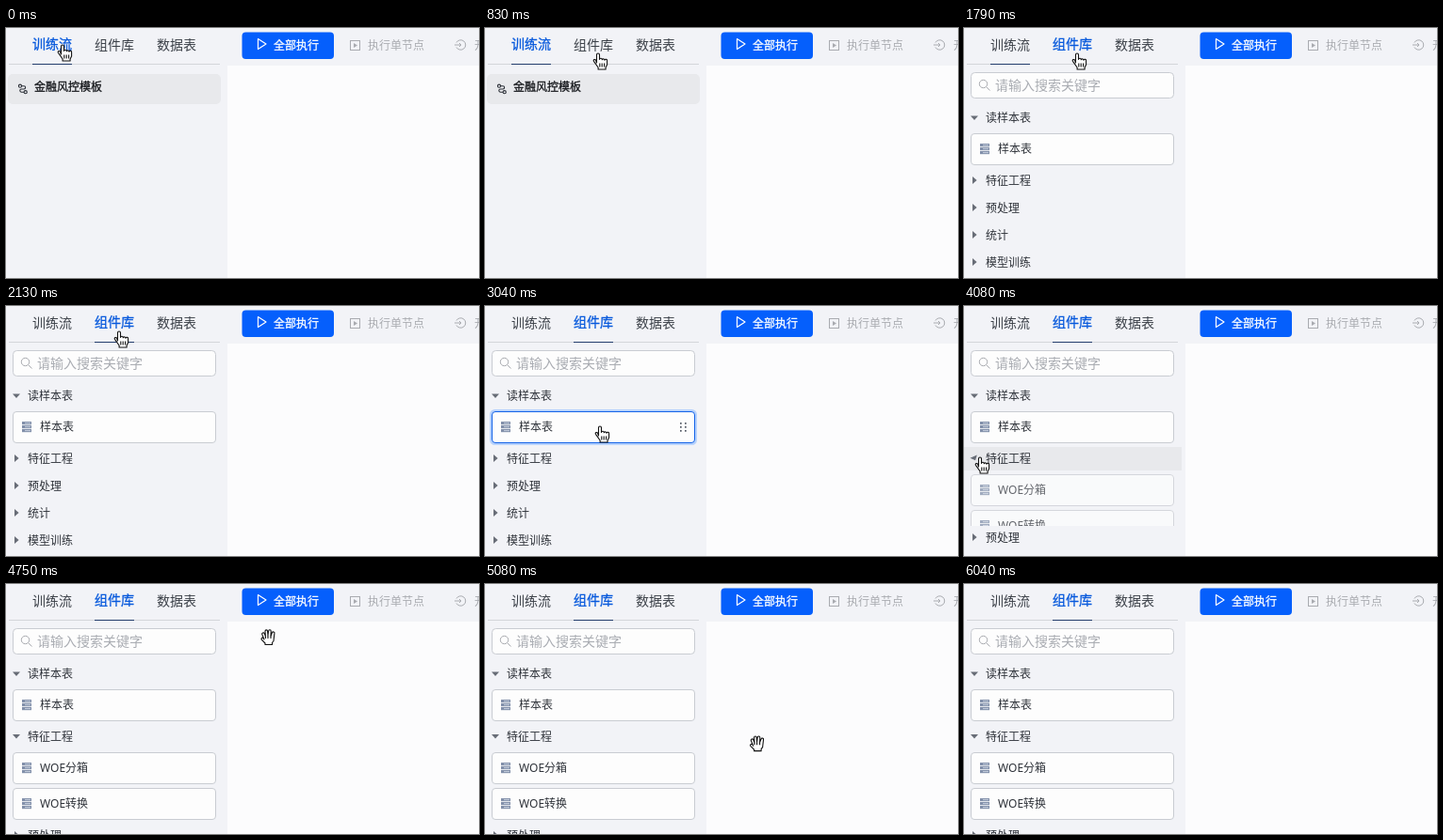
An HTML page for the animation above (6.71 s loop, 502x266 px).

```html
<!DOCTYPE html>
<html lang="zh-CN">
<head>
<meta charset="utf-8">
<style>
  html, body { margin: 0; width: 100%; height: 100%; overflow: hidden; background: #f2f3f7; }
  svg { display: block; }
  text { font: 12px "Noto Sans", "Noto Sans CJK SC", "Noto Sans CJK", "Noto Sans CJK JP", sans-serif; fill: #2f333a; }
  .tab { font-size: 14px; fill: #3b4048; }
  .tab.on { fill: #0759dc; stroke: #0759dc; stroke-width: .3; transform: translateY(-1px); }
  .strong { fill: #15171b; stroke: #15171b; stroke-width: .3; }
  .white { fill: #fff; stroke: #fff; stroke-width: .3; }
  .hint { font-size: 14px; fill: #a9acb2; }
  .off { fill: #a9abb0; }
  .line { fill: none; stroke: #a9abb0; }
  .box { fill: #fdfdfd; stroke: #c9ccd2; }
  .arrow { fill: #676c76; }
  .row { fill: none; }
  .hot > .row { fill: #e8e9ec; }
  .glow, .grip { visibility: hidden; }
  .hot > .glow, .hot > .grip { visibility: visible; }
  .hot > .box { stroke: #1262e8; }
  .hand path { fill: #fff; stroke: #111; stroke-width: 1.1; stroke-linejoin: round; }
</style>
</head>
<body>
<svg id="stage" width="502" height="266" viewBox="0 0 502 266"></svg>
<script>
const LOOP = 6710, SWITCH = 1790, EXPAND = 3960, HIDE = 6000, BODY = 76, BODY_TOP = 179;

// Pointer stops: time, x, y
const stops = [
  [40, 60, 18], [710, 120, 27], [2500, 120, 27], [3040, 122, 128],
  [3210, 122, 128], [3580, 17, 161], [4400, 17, 161], [4750, 278, 57],
  [4790, 278, 57], [5210, 290, 185]
];

const text = (x, y, s, cls = '') => `<text x="${x}" y="${y}" class="${cls}">${s}</text>`;

const header = (mid, label, open) => `
  <g class="hover" data-y="${mid - 12}" data-h="25">
    <rect class="row" y="${mid - 12}" width="231" height="25"/>
    <path class="arrow" d="M-2-4L2.6 0L-2 4z" transform="translate(11 ${mid})${open ? ' rotate(90)' : ''}"/>
    ${text(23, mid + 4.5, label)}
  </g>`;

const item = (top, label, shift = 0) => {
  const bars = [0, 4, 8].map(d => `
    <rect x="17" y="${top + 11 + d}" width="10" height="3.2" fill="#8290aa"/>
    <path d="M20 ${top + 12.6 + d}h6" stroke="#c8d0df"/>`).join('');
  const dots = [0, 1, 2, 3, 4, 5].map(i =>
    `<rect x="${207 + i % 2 * 5}" y="${top + 12 + (i >> 1) * 4}" width="1.7" height="1.7" fill="#555b66"/>`).join('');
  return `
  <g class="hover" data-y="${top + shift}" data-h="34">
    <rect class="glow" x="6.5" y="${top - .5}" width="217" height="35" rx="4" fill="none" stroke="#b7d2fc" stroke-width="3"/>
    <rect class="box" x="7.5" y="${top + .5}" width="215" height="33" rx="3.5"/>
    ${bars}${text(36, top + 21, label)}<g class="grip">${dots}</g>
  </g>`;
};

const $ = id => document.getElementById(id);

$('stage').innerHTML = `
  <rect width="502" height="266" fill="#f2f3f7"/>
  <rect x="235" y="40" width="267" height="226" fill="#fcfcfd"/>
  <path d="M3 38.5H227" stroke="#d3d5da"/>
  <g id="tabs">${['训练流', '组件库', '数据表'].map((s, i) => text(28 + 66 * i, 23, s, 'tab')).join('')}</g>
  <rect id="bar" y="38" width="42" height="1" fill="#233d6c"/>

  <rect x="250.5" y="4.5" width="97.5" height="28.5" rx="4" fill="#055ffc"/>
  <path d="M267.5 11.5L276 17L267.5 22.5z" fill="none" stroke="#fff" stroke-width="1.2" stroke-linejoin="round"/>
  ${text(284, 23, '全部执行', 'white')}
  <rect class="line" x="365.5" y="13.5" width="10" height="10"/>
  <path d="M369 16L373 18.5L369 21z" fill="#a9abb0"/>
  ${text(384, 23, '执行单节点', 'off')}
  <path class="line" d="M478 15.5A5.2 5.2 0 1 1 478 20.5M476 18h7m-2-2l2 2l-2 2"/>
  ${text(497, 23, '开', 'off')}

  <g id="flow">
    <rect x="2" y="49" width="226" height="32" rx="5" fill="#e8e9ec"/>
    <g fill="none" stroke="#2b2f37" stroke-width="1.1">
      <circle cx="15" cy="61.7" r="1.6"/><circle cx="20.7" cy="68.2" r="1.6"/>
      <path d="M16.6 61.7h2.4a1.6 1.6 0 0 1 0 3.3h-2.6a1.6 1.6 0 0 0 0 3.2h2.7"/>
    </g>
    ${text(30, 67, '金融风控模板', 'strong')}
  </g>

  <g id="lib">
    <rect class="box" x="7.5" y="47.5" width="215" height="27" rx="4"/>
    <g class="line"><circle cx="20.5" cy="59.5" r="4.2"/><path d="M23.5 62.5L27.5 66.5"/></g>
    ${text(33, 66, '请输入搜索关键字', 'hint')}
    ${header(95.5, '读样本表', true)}
    ${item(112, '样本表')}
    <g id="group">${header(162, '特征工程')}</g>
    <svg id="body" y="${BODY_TOP}" width="235">${item(0, 'WOE分箱', BODY_TOP)}${item(38, 'WOE转换', BODY_TOP)}</svg>
    <g id="rest">${['预处理', '统计', '模型训练'].map((s, i) => header(191 + 29 * i, s)).join('')}</g>
  </g>

  <g id="point" class="hand">
    <path d="M-1.5 10V1.5a1.5 1.5 0 0 1 3 0V6.5a1.4 1.4 0 0 1 2.8.3a1.4 1.4 0 0 1 2.7.5a1.3 1.3 0 0 1 2.6.7V12l-1.5 3v2h-8v-2l-3.2-4.6-1.6-2.2c-.6-1.6 1.2-2.2 2.2-1.2z"/>
    <path d="M1.8 10.5v4m2.4-4v4m2.4-4v4"/>
  </g>
  <g id="open" class="hand">
    <path d="M-4 2L-6.2-3.4a1.3 1.3 0 0 1 2.4-1L-2.6-1.5L-3-6.8a1.3 1.3 0 0 1 2.6 0L0-2L.6-7a1.3 1.3 0 0 1 2.6.2L3-1.5L4.4-5.2a1.3 1.3 0 0 1 2.5.8L6 3.5L4.5 5.5V7.5H-3V6L-6.8 2.2a1.3 1.3 0 0 1 1.8-1.8z"/>
    <path d="M-2.6-1.5V1M0-2V1M3-1.5V1"/>
  </g>`;

const tabs = [...$('tabs').children];
const hovers = [...document.querySelectorAll('.hover')];
const arrow = $('group').querySelector('.arrow');

const ease = u => u < .5 ? 4 * u ** 3 : 1 - 4 * (1 - u) ** 3;
const phase = (t, from, to) => ease(Math.min(1, Math.max(0, (t - from) / (to - from))));
const show = (el, on) => { el.style.display = on ? '' : 'none'; };

function pointer(t) {
  let [, x, y] = stops[0];
  for (let i = 1; i < stops.length; i++) {
    const [t0, x0, y0] = stops[i - 1], [t1, x1, y1] = stops[i];
    const k = phase(t, t0, t1);
    x += (x1 - x0) * k;
    y += (y1 - y0) * k;
  }
  return [x, y];
}

function draw(t) {
  const lib = t >= SWITCH;
  show($('flow'), !lib);
  show($('lib'), lib);
  tabs.forEach((tab, i) => tab.classList.toggle('on', i === +lib));
  $('bar').setAttribute('x', 28 + 66 * phase(t, SWITCH, SWITCH + 250));

  const k = phase(t, EXPAND, EXPAND + 205);
  $('body').setAttribute('height', BODY * k);
  $('body').style.opacity = k;
  show($('body'), k > 0);
  $('rest').setAttribute('transform', `translate(0 ${BODY * k})`);
  arrow.setAttribute('transform', `translate(11 162) rotate(${90 * k})`);

  const [x, y] = pointer(t), onCanvas = x > 235 && y > 40;
  for (const el of hovers) {
    const shift = el.parentNode.id === 'rest' ? BODY * k : 0;
    const dy = y - el.dataset.y - shift;
    el.classList.toggle('hot', lib && t < HIDE && x < 223 && dy >= 0 && dy < el.dataset.h);
  }
  show($('point'), t < HIDE && !onCanvas);
  show($('open'), t < HIDE && onCanvas);
  for (const id of ['point', 'open']) $(id).setAttribute('transform', `translate(${x} ${y})`);
}

function tick() {
  draw(performance.now() % LOOP);
  requestAnimationFrame(tick);
}
tick();
</script>
</body>
</html>
```
